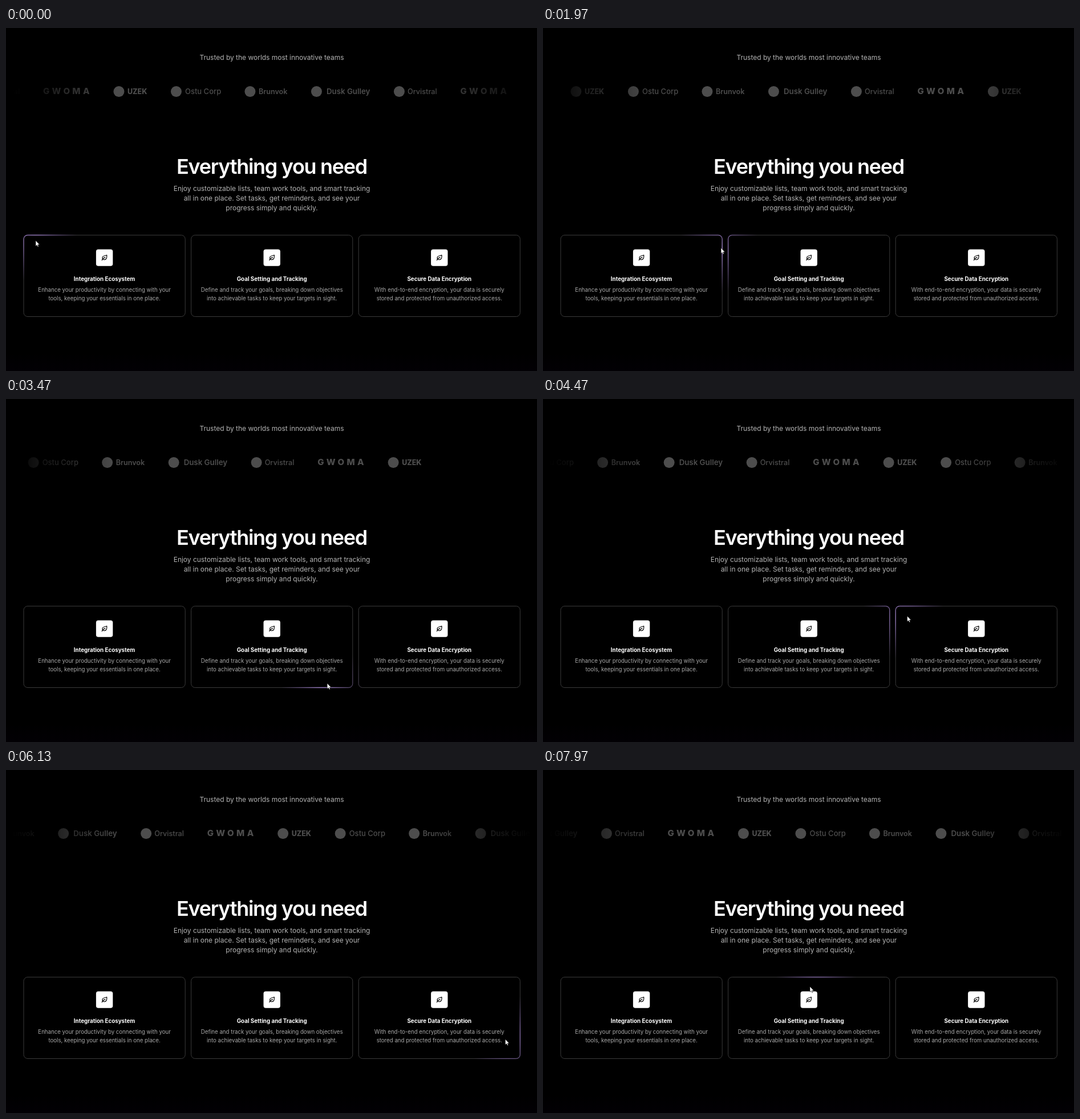
Write an HTML page that moves like this. It is 931 px wide and 602 px high and loops after 8 s.

```html
<!DOCTYPE html>
<html lang="en">
<head>
<meta charset="utf-8">
<title>Everything you need</title>
<style>
  html, body { margin: 0; width: 100%; height: 100%; overflow: hidden; background: #000; }
  svg { display: block; font-family: Inter, sans-serif; }
  .center { text-anchor: middle; }
  .lead { font-size: 11.97px; fill: #b3b3b3; }
  .heading { font-size: 36px; font-weight: 600; letter-spacing: -1.3px; fill: #fff; }
  .title { font-size: 9.8px; font-weight: 700; fill: #fff; }
  .body { font-size: 9.68px; fill: #a8a8a8; }
  .brands { fill: #4d4d4d; }
  .frame { fill: none; stroke: #3a3a3a; }
  .glow { fill: none; stroke: url(#spot); stroke-width: 1.4; }
  .leaf { fill: none; stroke: #000; stroke-width: 1.3; stroke-linecap: round; stroke-linejoin: round; }
</style>
</head>
<body>
<svg width="931" height="602" viewBox="0 0 931 602">
  <defs>
    <linearGradient id="fade" gradientUnits="userSpaceOnUse" x1="11" y1="0" x2="920" y2="0">
      <stop offset="0" stop-color="#fff" stop-opacity="0"/>
      <stop offset=".2" stop-color="#fff"/>
      <stop offset=".8" stop-color="#fff"/>
      <stop offset="1" stop-color="#fff" stop-opacity="0"/>
    </linearGradient>
    <mask id="edges" maskUnits="userSpaceOnUse" x="0" y="90" width="931" height="44" style="mask-type:alpha">
      <rect y="90" width="931" height="44" fill="url(#fade)"/>
    </mask>
    <radialGradient id="spot" gradientUnits="userSpaceOnUse" r="73">
      <stop offset="0" stop-color="#a98bd2"/>
      <stop offset="1" stop-color="#8a62c4" stop-opacity="0"/>
    </radialGradient>
    <linearGradient id="dusk" x1="0" y1="0" x2="0" y2="1">
      <stop offset="0" stop-color="#000"/>
      <stop offset="1" stop-color="#020004"/>
    </linearGradient>
  </defs>
  <rect y="570" width="931" height="32" fill="url(#dusk)"/>
  <text class="center lead" x="466" y="55.5">Trusted by the worlds most innovative teams</text>
  <g mask="url(#edges)"><g id="ticker" class="brands"></g></g>
  <text class="center heading" x="466" y="256">Everything you need</text>
  <g id="intro"></g>
  <g id="cards"></g>
  <path id="cursor" d="M0 0V9.8L2.2 7.8L3.7 11L5.2 10.3L3.8 7.2H6.8Z" fill="#fff" stroke="#000" stroke-width=".5"/>
</svg>
<script>
const $ = id => document.getElementById(id);
const LOOP = 8000;
const PERIOD = 731.5;
const LATE_AT = 4400;   // trailing brands of the repeated strip appear here
const GLOW_LAG = 50;

const brands = [
  { name: 'GWOMA', text: 65, size: 15, weight: 800, spacing: 4.4 },
  { name: 'UZEK', dot: 198, text: 213, size: 12.5, weight: 800 },
  { name: 'Ostu Corp', dot: 298.5, text: 314, size: 13, weight: 500 },
  { name: 'Brunvok', dot: 428, text: 443, size: 12.6, weight: 600 },
  { name: 'Dusk Gulley', dot: 544.5, text: 562, size: 13.3, weight: 600 },
  { name: 'Orvistral', dot: 689.5, text: 704, size: 12.7, weight: 500 },
];

const cards = [
  ['Integration Ecosystem',
    'Enhance your productivity by connecting with your', 'tools, keeping your essentials in one place.'],
  ['Goal Setting and Tracking',
    'Define and track your goals, breaking down objectives', 'into achievable tasks to keep your targets in sight.'],
  ['Secure Data Encryption',
    'With end-to-end encryption, your data is securely', 'stored and protected from unauthorized access.'],
];

const intro = [
  'Enjoy customizable lists, team work tools, and smart tracking',
  'all in one place. Set tasks, get reminders, and see your',
  'progress simply and quickly.',
];

// [ms, x, y]
const pointerPath = [
  [0, 52, 373], [1070, 60, 487], [1600, 270, 490], [1970, 312, 386], [2500, 345, 465],
  [3470, 563, 499], [4100, 602, 410], [4600, 660, 376], [5470, 871, 372], [6100, 880, 470],
  [6770, 698, 484], [7300, 618, 425], [7970, 468, 380],
];

// [ms, distance scrolled]
const scrollPath = [[0, 0], [1070, 73], [1970, 140], [3470, 250.3], [5470, 396.3], [6770, 489.8], [7970, 578], [8000, 580.2]];

const label = (cls, x, y, str) => `<text class="center ${cls}" x="${x}" y="${y}">${str}</text>`;

function brandMarkup({ name, dot, text, size, weight, spacing = 0 }, index, copy) {
  const late = copy === 1 && index > 1 ? 'class="late"' : '';
  const mark = dot ? `<circle cx="${dot}" cy="111.5" r="9.5"/>` : '';
  return `<g ${late} transform="translate(${copy * PERIOD})">${mark}
    <text x="${text}" y="116" font-size="${size}" font-weight="${weight}" letter-spacing="${spacing}">${name}</text></g>`;
}

function cardMarkup([title, ...lines], index) {
  const left = 31 + index * 293.6;
  const mid = left + 141.6;
  const box = `x="${left}" y="363.5" width="283.2" height="143" rx="7"`;
  return `<rect class="frame" ${box}/><rect class="glow" ${box}/>
    <rect x="${mid - 14.7}" y="388.4" width="29.4" height="29.4" rx="4" fill="#fff"/>
    <path class="leaf" transform="translate(${mid} 403) scale(.92)"
      d="M4.5-4.8C5 1 3.5 4-.4 4C-4 4-4.8 .8-3.3-1.6C-1.6-4.2 2-3.4 4.5-4.8ZM-4.7 5C-4 2.4-1.4 .6 1.4-.4"/>
    ${label('title', mid, 443.6, title)}
    ${lines.map((line, i) => label('body', mid, 463.4 + i * 14.6, line)).join('')}`;
}

$('ticker').innerHTML = [-1, 0, 1].map(copy => brands.map((b, i) => brandMarkup(b, i, copy)).join('')).join('');
$('intro').innerHTML = intro.map((line, i) => label('lead', 466, 285.5 + i * 17, line)).join('');
$('cards').innerHTML = cards.map(cardMarkup).join('');
const lateBrands = document.querySelectorAll('.late');

function segment(path, t) {
  const next = path.findIndex(p => p[0] > t);
  const i = next < 0 ? path.length - 2 : Math.max(next - 1, 0);
  const u = (t - path[i][0]) / (path[i + 1][0] - path[i][0]);
  return [i, Math.min(Math.max(u, 0), 1)];
}

function scrolled(t) {
  const [i, u] = segment(scrollPath, t);
  return scrollPath[i][1] + u * (scrollPath[i + 1][1] - scrollPath[i][1]);
}

// Smooth curve through the waypoints, with tangents taken from their neighbours
function pointer(t) {
  const [i, u] = segment(pointerPath, t);
  const a = pointerPath[i], b = pointerPath[i + 1];
  const before = pointerPath[i - 1] || a, after = pointerPath[i + 2] || b;
  const span = b[0] - a[0];
  return [1, 2].map(k => {
    const out = (b[k] - before[k]) / (b[0] - before[0]) * span;
    const into = (after[k] - a[k]) / (after[0] - a[0]) * span;
    const s = u * u * (3 - 2 * u);
    return a[k] + (b[k] - a[k]) * s + out * u * (1 - u) ** 2 - into * u * u * (1 - u);
  });
}

function draw(now) {
  const t = now % LOOP;
  $('ticker').setAttribute('transform', `translate(${-scrolled(t)})`);
  lateBrands.forEach(el => el.setAttribute('visibility', t < LATE_AT ? 'hidden' : 'visible'));
  $('cursor').setAttribute('transform', `translate(${pointer(t)})`);
  const [x, y] = pointer(t - GLOW_LAG);
  $('spot').setAttribute('cx', x);
  $('spot').setAttribute('cy', y);
  requestAnimationFrame(draw);
}
draw(0);
</script>
</body>
</html>
```
